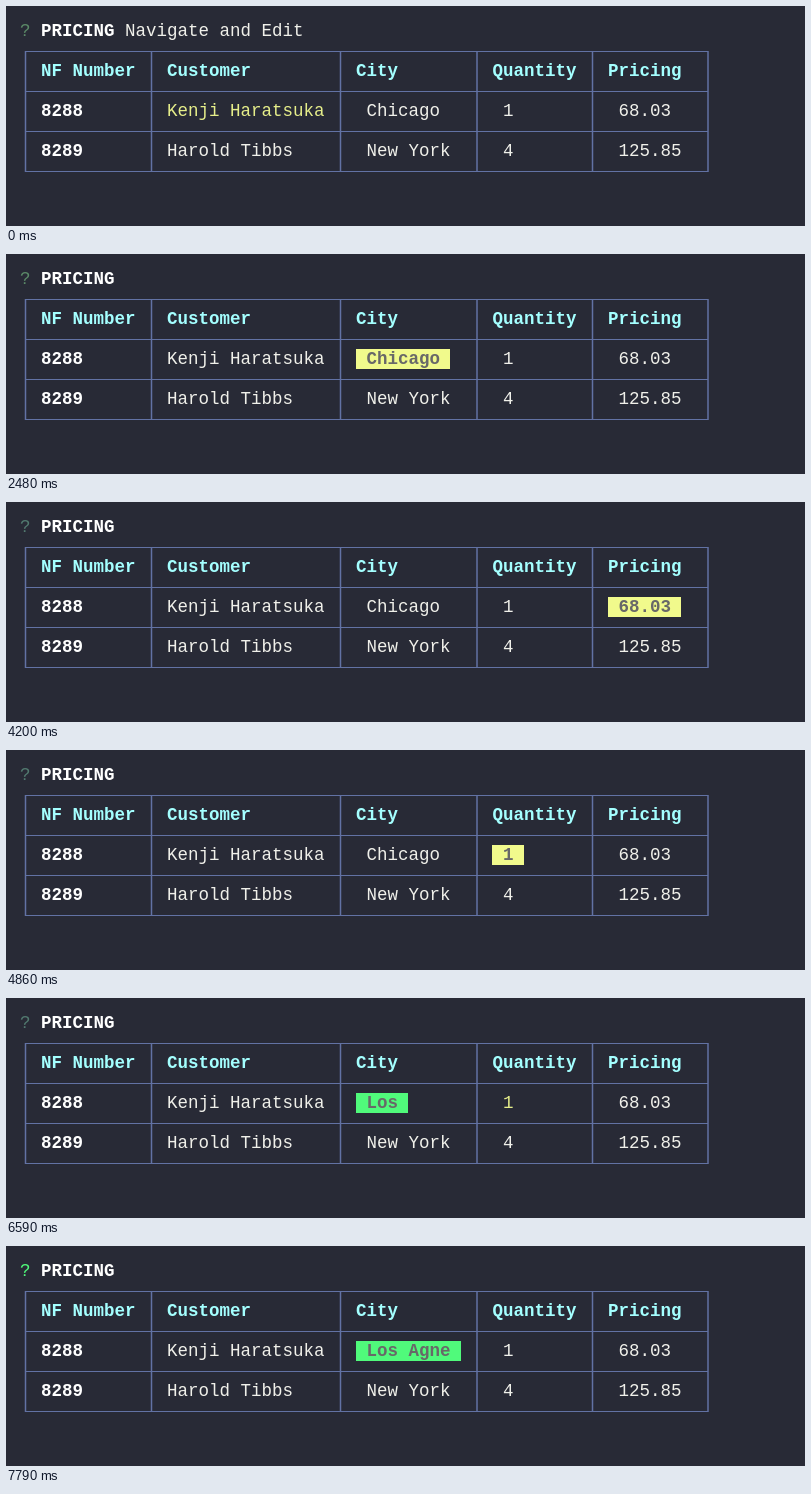
Write an HTML page that moves like this. It is 799 px wide and 220 px high and loops after 7990 ms.

```html
<!DOCTYPE html>
<html lang="en">
<head>
<meta charset="utf-8">
<title>Editable pricing table</title>
<style>
  html, body { margin: 0; width: 100%; height: 100%; overflow: hidden; background: #282a36; }
  svg { display: block; width: 799px; height: 220px; }
  text { font: 17.5px "Courier New", "Liberation Mono", monospace; fill: #f0f0ea; white-space: pre; }
  .bold { font-weight: 700; fill: #fff; }
  .head { font-weight: 700; fill: #a4ffff; }
  .yellow { fill: #e6ee8a; }
  .active { font-weight: 700; fill: #686868; }
</style>
</head>
<body>
<svg id="stage" viewBox="0 0 799 220"></svg>
<script>
const LOOP = 7990, LEFT = 14, CELL = 10.5, ROW = 20;
const YELLOW = '#f1fa8c', GREEN = '#50fa7b';
const stage = document.getElementById('stage');

function add(tag, attrs, content = '') {
  const el = document.createElementNS('http://www.w3.org/2000/svg', tag);
  for (const key in attrs) el.setAttribute(key, attrs[key]);
  el.textContent = content;
  return stage.appendChild(el);
}

// Terminal grid: character column, text line
const colX = col => LEFT + CELL * col;
const put = (col, line, str, cls = '') =>
  add('text', { x: colX(col), y: 30 + ROW * line, class: cls }, str);

// Table frame
const edges = [0, 12, 30, 43, 54, 65].map(col => colX(col + 0.5) + 0.25);
const rules = [45.5, 85.5, 125.5, 165.5];
const frame = edges.map(x => `M${x} 45V166`).join('');
const bars = rules.map(y => `M${edges[0]} ${y}H${edges[5]}`).join('');
add('path', { d: frame, stroke: '#6272a4', 'stroke-width': 1.5 });
add('path', { d: bars, stroke: '#6272a4', 'stroke-width': 1 });

const marker = add('rect', { height: ROW });

// Prompt line and fixed text
const mark = put(0, 0, '?');
put(2, 0, 'PRICING', 'bold');
const hint = put(10, 0, 'Navigate and Edit');
const heads = { 2: 'NF Number', 14: 'Customer', 32: 'City', 45: 'Quantity', 56: 'Pricing' };
for (const col in heads) put(+col, 2, heads[col], 'head');
put(2, 4, '8288', 'bold');
put(2, 6, '8289', 'bold');
const customer = put(14, 4, 'Kenji Haratsuka');
put(14, 6, 'Harold Tibbs');

const cell = (col, line, value) => ({ col, line, value, el: put(col + 1, line, value) });
const city = cell(32, 4, 'Chicago');
const city2 = cell(32, 6, 'New York');
const qty = cell(45, 4, '1');
const price = cell(56, 4, '68.03');
cell(45, 6, '4');
cell(56, 6, '125.85');
const cells = [city, city2, qty, price];

// [start, selected cell, typed value]
const steps = [
  [0, null],
  [2480, city], [3070, city2], [3470, city], [3870, qty],
  [4200, price], [4860, qty], [5650, city],
  [6260, city, 'L'], [6460, city, 'Lo'], [6590, city, 'Los'], [6920, city, 'Los '],
  [7190, city, 'Los A'], [7390, city, 'Los Ag'], [7590, city, 'Los Agn'], [7790, city, 'Los Agne']
];
const markColors = [[0, '#5b8a68'], [4200, '#527a70'], [6920, GREEN]];

const at = (table, t) => table.filter(row => row[0] <= t).pop();

function draw(t) {
  const [, active, typed] = at(steps, t);
  for (const c of cells) {
    c.el.textContent = c === active && typed ? typed : c.value;
    c.el.setAttribute('class', c === active ? 'active' : '');
  }
  if (t >= 5650 && t < 6920) qty.el.setAttribute('class', 'yellow');
  customer.setAttribute('class', active ? '' : 'yellow');
  hint.style.display = active ? 'none' : '';
  mark.style.fill = at(markColors, t)[1];

  marker.style.display = active ? '' : 'none';
  if (active) {
    // Cell backgrounds snap to whole pixels
    const length = (typed || active.value).length + 2;
    const x = Math.floor(colX(active.col));
    marker.setAttribute('x', x);
    marker.setAttribute('y', 15 + ROW * active.line);
    marker.setAttribute('width', Math.floor(colX(active.col + length)) - x);
    marker.setAttribute('fill', typed ? GREEN : YELLOW);
  }
}

function tick() {
  draw(performance.now() % LOOP);
  requestAnimationFrame(tick);
}
tick();
</script>
</body>
</html>
```
